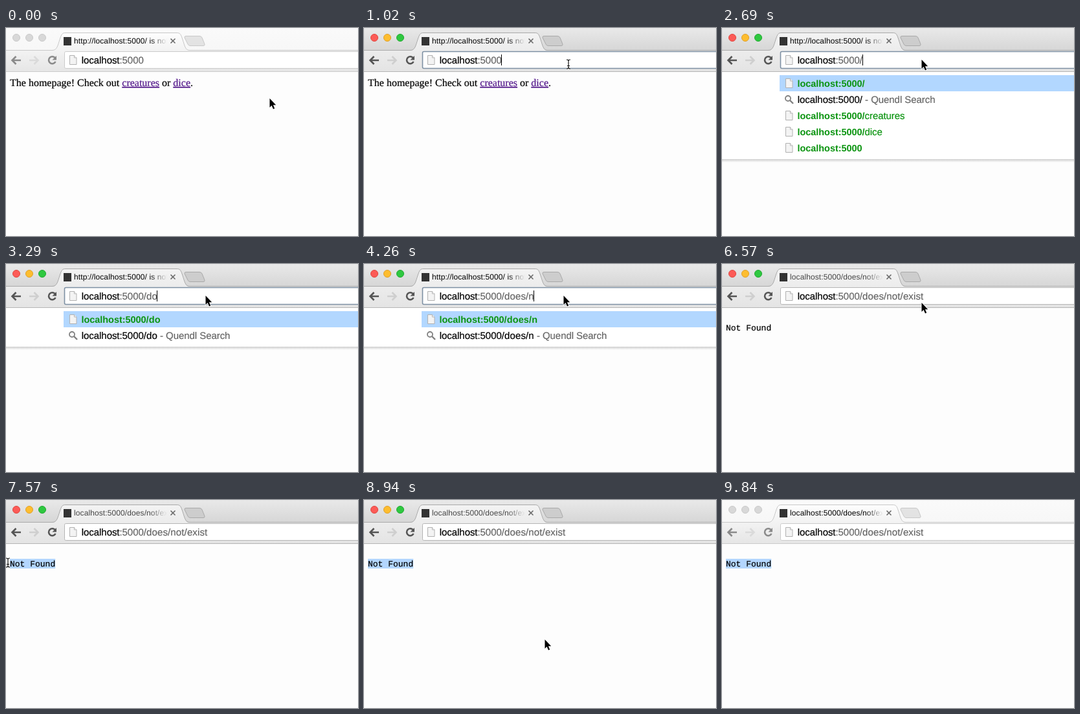
Write an HTML page that moves like this. It is 544 px wide and 322 px high and loops after 9.94 s.

```html
<!DOCTYPE html>
<html lang="en">
<head>
<meta charset="utf-8">
<title>Not Found demo</title>
<style>
  html, body { margin: 0; width: 100%; height: 100%; overflow: hidden; background: #fdfdfd; }
  svg {
    display: block; width: 544px; height: 322px;
    --strip-a: #e9e9e9; --strip-b: #d6d6d6; --bar-a: #f3f3f3; --bar-b: #e4e4e4;
    --edge: #a9a9a9; --line: #b5b5b5; --icon: #555; --next: #cfcfcf; --title: #000; --plus: #cdcdcd;
  }
  svg.idle {
    --strip-a: #fafafa; --strip-b: #f7f7f7; --bar-a: #fdfdfd; --bar-b: #e6e6e6;
    --edge: #c8c8c8; --line: #cbcbcb; --icon: #8a8a8a; --next: #dadada; --plus: #e3e3e3;
  }
  svg.loaded:not(.idle) { --title: #444; }
  text { white-space: pre; text-rendering: geometricPrecision; }
  .ui, .page, .mono { fill: currentColor; stroke: currentColor; stroke-width: .2px; }
  .ui { font: 15px "Liberation Sans", Arial, sans-serif; letter-spacing: -.06px; }
  .typed { letter-spacing: .13px; }
  .title { font-size: 12px; letter-spacing: .1px; fill: url(#fade); stroke: none; }
  .page { font: 16px "Liberation Serif", Times, serif; }
  .mono { font: 13px "Liberation Mono", Courier, monospace; }
  .link { color: #551a8b; text-decoration: underline 1px; text-underline-offset: 1px; }
  .soft { color: #666; }
  .green { color: #0b9410; }
  .match { font-weight: bold; font-size: 14.5px; letter-spacing: -.05px; stroke: none; }
  .icon { fill: none; stroke: var(--icon); stroke-width: 2.6; }
  .light { stroke-width: 1; fill: var(--c); stroke: var(--s); }
  .idle .light { fill: #d8d8d8; stroke: #c9c9c9; }
  #field { fill: #fff; stroke: var(--line); }
  #field.focus { stroke: #7d90a3; stroke-width: 1.6; }
</style>
</head>
<body>
<svg id="stage" class="idle" viewBox="0 0 544 322" xmlns="http://www.w3.org/2000/svg">
  <defs>
    <linearGradient id="strip" x2="0" y2="1">
      <stop style="stop-color:var(--strip-a)"/><stop offset="1" style="stop-color:var(--strip-b)"/>
    </linearGradient>
    <linearGradient id="bar" gradientUnits="userSpaceOnUse" x1="0" y1="8" x2="0" y2="67">
      <stop style="stop-color:var(--bar-a)"/><stop offset="1" style="stop-color:var(--bar-b)"/>
    </linearGradient>
    <linearGradient id="fade" gradientUnits="userSpaceOnUse" x1="222" x2="249" y1="0" y2="0">
      <stop style="stop-color:var(--title)"/><stop offset="1" style="stop-color:var(--title);stop-opacity:0"/>
    </linearGradient>
    <linearGradient id="shade" x2="0" y2="1">
      <stop stop-color="#cecece"/><stop offset="1" stop-color="#fdfdfd"/>
    </linearGradient>
    <g id="doc" fill="#f3f3f3" stroke="#b0b0b0">
      <path d="M.5 .5H7.5L11 4V14.5H.5Z"/><path d="M7.5 .5V4H11" fill="#fff"/>
    </g>
    <path id="caretbeam" d="M-3 -7Q0 -7 0 -5Q0 -7 3 -7M0 -5V5M-3 7Q0 7 0 5Q0 7 3 7M-2 2.5H2"/>
  </defs>

  <rect width="544" height="322" fill="#fdfdfd"/>

  <g id="home">
    <text class="page" x="6" y="90">The homepage! Check out <tspan class="link">creatures</tspan> or <tspan class="link">dice</tspan>.</text>
  </g>
  <g id="missing">
    <rect id="mark" x="6" y="91" width="0" height="15" fill="#b3d6fe"/>
    <text class="mono" x="6" y="103">Not Found</text>
  </g>

  <g id="popup" class="ui">
    <rect id="sheet" y="68" width="544" fill="#fff" stroke="none"/>
    <rect id="shadow" width="544" height="5" fill="url(#shade)" stroke="none"/>
    <rect x="89" y="73" width="455" height="25" fill="#b2d7ff" stroke="none"/>
    <use href="#doc" x="98" y="78" stroke-width="1"/>
    <text class="green match" x="116.5" y="91">localhost:5000<tspan class="typed"></tspan></text>
    <g fill="none" stroke="#808080" stroke-width="1.8">
      <circle cx="102" cy="109" r="4"/><path d="M105 112L110 117" stroke-width="2.4"/>
    </g>
    <text x="116.8" y="116">localhost:5000<tspan class="typed"></tspan><tspan class="soft"> - Quendl Search</tspan></text>
    <g id="extra"></g>
  </g>

  <rect width="544" height="35" fill="url(#strip)"/>
  <circle class="light" cx="16" cy="15" r="5.5" style="--c:#fc5b57;--s:#e2463f"/>
  <circle class="light" cx="36" cy="15" r="5.5" style="--c:#fdbd2f;--s:#e0a028"/>
  <circle class="light" cx="56" cy="15" r="5.5" style="--c:#2fc840;--s:#1fa92f"/>
  <rect y="35" width="544" height="32" fill="url(#bar)"/>
  <path d="M72 35.5C79 34 80 27 83 18C86 9 87 7.5 92 7.5H264C269 7.5 270 9 273 18C276 27 277 34 283 35.5Z" fill="url(#bar)"/>
  <path d="M0 34.5H72C79 34 80 27 83 18C86 9 87 7.5 92 7.5H264C269 7.5 270 9 273 18C276 27 277 34 283 34.5H544" fill="none" style="stroke:var(--edge)"/>
  <path d="M278 12.5H299Q302 12.5 303 15L307 25Q307.5 27.5 305 27.5H285Q282 27.5 281 25L276 15Q275.5 12.5 278 12.5Z" style="fill:var(--plus);stroke:var(--edge)"/>
  <rect x="89" y="14" width="12" height="13" fill="#333"/>
  <text id="title" class="ui title" x="105" y="24"></text>
  <path d="M254.5 16.5L261.5 23.5M261.5 16.5L254.5 23.5" stroke="#6b6b6b" stroke-width="1.6"/>

  <path class="icon" d="M23 50H10M15.5 44L9.5 50L15.5 56"/>
  <path class="icon" d="M36 50H49M43.5 44L49.5 50L43.5 56" style="stroke:var(--next)"/>
  <path class="icon" d="M76 46.5A5.5 5.5 0 1 0 76.5 52"/>
  <path d="M78 43V49.5H71.5Z" style="fill:var(--icon)"/>
  <path d="M0 67.5H544" style="stroke:var(--line)"/>

  <rect id="field" x="90.5" y="36.5" width="470" height="26" rx="2"/>
  <use href="#doc" x="98" y="42"/>
  <rect id="picked" x="116" y="41" width="97" height="17" fill="#b3d6fe"/>
  <text id="url" class="ui" x="116.8" y="55">localhost<tspan class="soft">:5000<tspan class="typed"></tspan></tspan></text>
  <rect id="caret" y="41" width="1" height="17"/>

  <path id="arrow" d="M.5 0V14L3.6 11L6 16.4L8.2 15.5L5.9 10.2H10.2Z" stroke="#fff" stroke-width="1.6" paint-order="stroke"/>
  <g id="beam" fill="none">
    <use href="#caretbeam" stroke="#fff" stroke-width="2.6" opacity=".7"/>
    <use href="#caretbeam" stroke="#111" stroke-width="1.2"/>
  </g>
</svg>
<script>
const LOOP = 9940, HOST = 'localhost:5000', PATH = '/does/not/exist';
const KEYS = [2690, 3160, 3290, 3410, 3550, 3910, 4150, 4270, 4380, 4620, 4800, 5100, 5300, 5420, 5570];
const CLOSE = 5740, COMMIT = 5840, DRAG = 7200, CHAR = 7.8;

const easeIn = u => u * u;
const easeOut = u => u * (2 - u);
const easeBoth = u => u * u * (3 - 2 * u);

// start, end, shape, x, y, easing
const MOVES = [
  [0, 0, 'arrow', 407, 109],
  [330, 820, 'arrow', 314, 55],
  [1020, 1020, 'beam', 316, 56],
  [1410, 1640, 'arrow', 308, 49],
  [5940, 5940, 'beam', 308, 50],
  [6570, 6570, 'arrow', 308, 60],
  [6570, 6850, 'arrow', 225, 115, easeIn],
  [6850, 7080, 'arrow', 82, 100, easeOut],
  [7080, 7080, 'beam', 78, 99],
  [DRAG, 7550, 'beam', 2, 97],
  [7570, 7570, 'beam', 3, 97],
  [8050, 8050, 'beam', 4, 97],
  [8440, 8480, 'beam', 14, 105, easeIn],
  [8480, 8760, 'arrow', 279, 216, easeOut],
  [8940, 9320, 'arrow', 545, 334]
];

const $ = id => document.getElementById(id);
const within = (t, a, b) => t >= a && t < b;
const show = (id, on) => { $(id).style.display = on ? '' : 'none'; };
const attr = (id, name, value) => $(id).setAttribute(name, value);
const setText = (el, s) => { if (el.textContent !== s) el.textContent = s; };
const typedSpans = document.querySelectorAll('.typed');

$('extra').innerHTML = ['creatures', 'dice', ''].map((word, i) => {
  const y = 128 + i * 25;
  return `<use href="#doc" x="98" y="${y}" stroke-width="1"/><text class="green" x="116.5" y="${y + 13}">` +
    `<tspan class="match">${HOST}${word && '/'}</tspan>${word}</text>`;
}).join('');

function pointer(t) {
  let x = 0, y = 0, shape;
  for (const [a, b, kind, tx, ty, ease = easeBoth] of MOVES) {
    if (t < a) break;
    const u = t >= b ? 1 : ease((t - a) / (b - a));
    x += (tx - x) * u;
    y += (ty - y) * u;
    shape = kind;
  }
  return { x: Math.round(x), y: Math.round(y), shape };
}

function draw(t) {
  const idle = t < 970 || t >= 9840;
  const loaded = t >= COMMIT;
  attr('stage', 'class', (idle ? 'idle ' : '') + (loaded ? 'loaded' : ''));
  show('home', !loaded);
  show('missing', loaded);
  setText($('title'), loaded ? HOST + PATH : 'http://' + HOST + '/ is not available');

  const typed = PATH.slice(0, KEYS.filter(k => t >= k).length);
  typedSpans.forEach(el => setText(el, typed));
  attr('field', 'class', within(t, 1020, CLOSE) ? 'focus' : '');
  show('picked', within(t, 1080, 1410));
  show('caret', within(t, 1020, 1080) || within(t, 1410, 2270) || within(t, KEYS[0], CLOSE));
  attr('caret', 'x', Math.floor(116.8 + $('url').getComputedTextLength()));

  const shrink = easeBoth(Math.min(1, Math.max(0, (t - KEYS[1]) / 110)));
  const bottom = Math.round(203 - 75 * shrink);
  show('popup', within(t, KEYS[0], CLOSE));
  show('extra', t < KEYS[1]);
  attr('sheet', 'height', bottom - 68);
  attr('shadow', 'y', bottom);

  const { x, y, shape } = pointer(t);
  for (const id of ['arrow', 'beam']) {
    show(id, id === shape);
    attr(id, 'transform', `translate(${x} ${y})`);
  }

  const reach = t < 7550 ? Math.min(9, Math.max(0, Math.round((x - 6) / CHAR))) : 0;
  const count = t < DRAG ? 0 : 9 - reach;
  attr('mark', 'x', 6 + CHAR * (9 - count));
  attr('mark', 'width', CHAR * count);
}

const start = performance.now();
function tick() {
  draw((performance.now() - start) % LOOP);
  requestAnimationFrame(tick);
}
tick();
</script>
</body>
</html>
```
